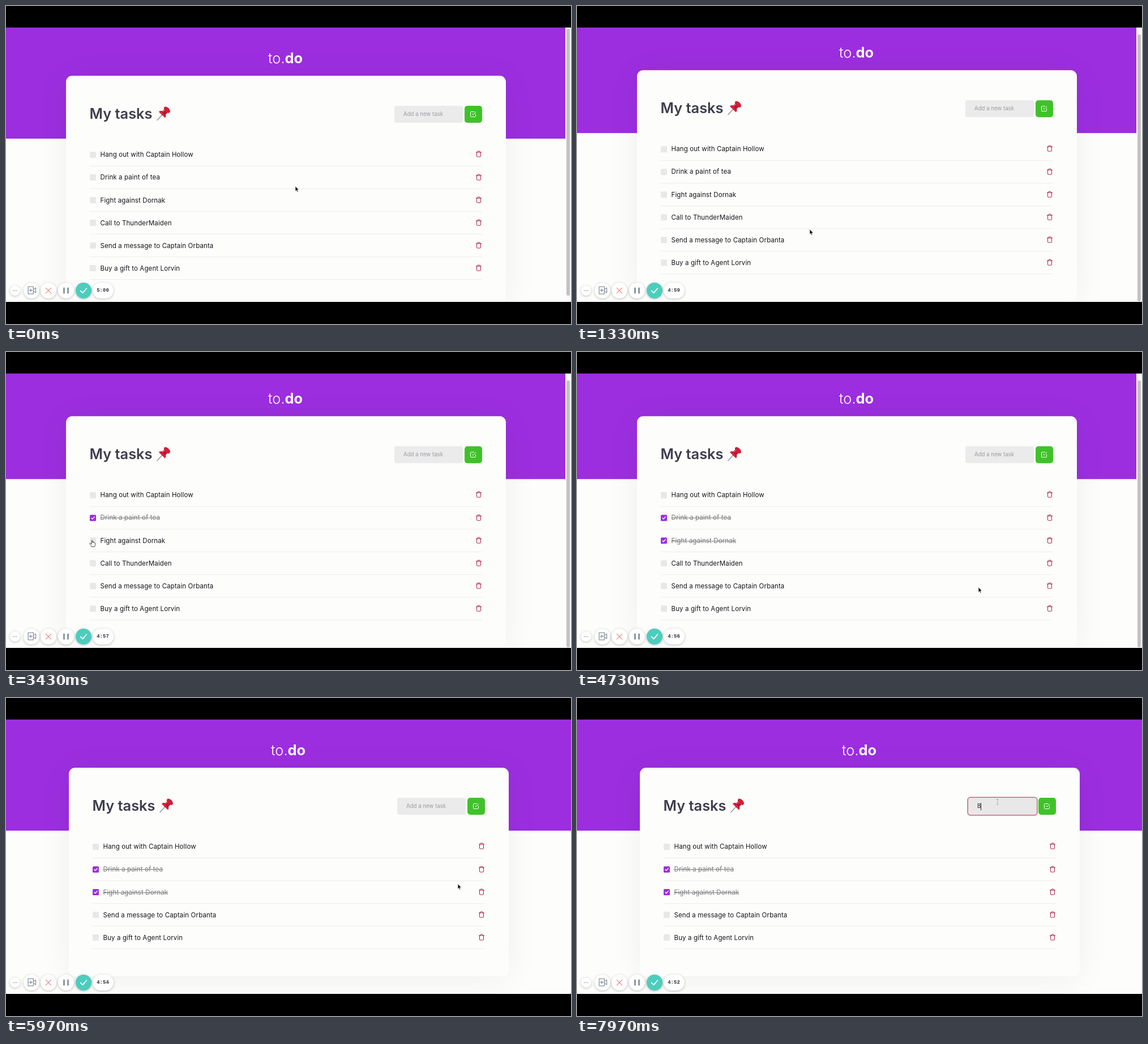
An HTML page for the animation above (8000 ms loop, 998 px wide and 561 px high).

```html
<!DOCTYPE html>
<html lang="en">
<head>
<meta charset="utf-8">
<title>Task list</title>
<style>
  html, body { margin: 0; width: 100%; height: 100%; overflow: hidden; background: #000; }
  #stage { position: relative; width: 998px; height: 561px; overflow: hidden; background: #000;
    font-family: Inter, "Open Sans", sans-serif; }
  #stage div, #stage svg { position: absolute; box-sizing: border-box; }
  svg { overflow: visible; fill: none; stroke-linecap: round; stroke-linejoin: round; }
  #view { left: 0; top: 37.5px; width: 998px; height: 484.5px; overflow: hidden; background: #fdfdfb; }
  #page { left: 0; top: 0; width: 988px; height: 494px; }
  #band { left: -10px; top: 0; width: 1020px; height: 196.5px; background: #9c2edf; }
  #brand { left: 463px; top: 38.5px; font-size: 25.4px; line-height: 31px; font-weight: 300; color: #fff; white-space: nowrap; }
  #brand b { font-weight: 700; }
  #card { left: 106px; top: 85.5px; width: 776.5px; border-radius: 11px; background: #fdfdfb; box-shadow: 0 4px 58px rgba(0,0,0,.06); }
  #head { left: 41.5px; top: 51px; font-size: 25.4px; line-height: 32px; font-weight: 620; color: #3d3d4d; white-space: nowrap; }
  #pin { left: 160px; top: 54px; }
  #field { left: 580px; top: 52.5px; width: 121px; height: 30.5px; border-radius: 4px; background: #ebebeb; }
  #field.on { background: #e8e8e8; box-shadow: 0 0 0 1.6px #d4607c; }
  #entry { left: 16px; top: 0; font-size: 9.65px; line-height: 30px; color: #9c9ca4; white-space: nowrap; }
  #entry.typed { color: #222; }
  #caret { top: 9px; width: 1px; height: 13px; background: #222; }
  #add { left: 704px; top: 52.5px; width: 30.5px; height: 30.5px; border-radius: 5px; background: #3fc229; }
  .row { left: 41.5px; width: 693px; height: 40.1px; border-bottom: 1px solid #ededf0; }
  .box { left: 0; top: 14px; width: 11px; height: 11px; border-radius: 1.5px; background: #e8e8e8; }
  .box svg { display: none; }
  .name { left: 19px; top: 9.5px; font-size: 11.5px; line-height: 20px; letter-spacing: .12px; color: #15151c; white-space: nowrap; }
  .done .box { background: #9c2edf; }
  .done .box svg { display: block; }
  .done .name { color: #77777f; text-decoration: line-through; }
  #track { right: 0; top: 0; width: 10.5px; height: 484.5px; background: #fafafa; }
  #thumb { left: 2.5px; width: 6px; height: 471px; border-radius: 3px; background: #c2c2c2; }
  .tool { background: #fff; border-radius: 15px; box-shadow: 0 1px 4px rgba(0,0,0,.25); }
  #clock { left: 152.5px; top: 487.5px; width: 37px; height: 28px; text-align: center; color: #333340;
    font: bold 9px/28px "Liberation Mono", "DejaVu Sans Mono", monospace; }
</style>
</head>
<body>
<div id="stage">
  <div id="view">
    <div id="page">
      <div id="band"></div>
      <div id="brand">to.<b>do</b></div>
      <div id="card">
        <div id="head">My tasks</div>
        <svg id="pin" width="25" height="26" viewBox="0 0 25 26">
          <path d="M1 24.5 10 14.5" stroke="#8d99a3" stroke-width="1.5"/>
          <path d="M4.5 10.2C3.6 8.6 6.2 7.4 10 8.4L14.6 4.4 20.3 10.2 16 14.4C17 18.2 15.6 20.6 14 19.6Z" fill="#c4132f"/>
          <path d="M5 9.7C9 10.5 13.5 15 14.6 19.4" stroke="#e5364c" stroke-width="1.4"/>
          <ellipse cx="18.4" cy="6.2" rx="6.8" ry="4" transform="rotate(45 18.4 6.2)" fill="#d01f39"/>
          <path d="M10.7 9.4 14.2 6.4" stroke="#ee6475" stroke-width="1.3"/>
        </svg>
        <div id="field"><div id="entry"></div><div id="caret"></div></div>
        <div id="add"></div>
      </div>
    </div>
    <div id="track"><div id="thumb"></div></div>
  </div>
  <div id="tools"></div>
  <svg id="cursor" width="1" height="1" style="left:0;top:0">
    <path data-kind="arrow" d="M0 0V9L2 7.2 3.5 10.3 5 9.6 3.6 6.6H6.4Z" fill="#111" stroke="#fff" stroke-width=".7"/>
    <path data-kind="hand" d="M-.9.8C-.9-.3.9-.3.9.8V4C2-.0 2.6 4 2.6 4.5 3.2 3.6 4 4 4.1 4.9 5 4.2 5.6 5 5.6 5.8V8.2C5.6 9.4 4.6 10 4.6 11.5H-1C-1.3 9.8-3.6 7.6-4.2 6.2-4.5 5.2-3.3 4.8-2.4 5.6L-.9 7Z" fill="#fff" stroke="#222" stroke-width=".8"/>
    <path data-kind="beam" d="M0-4V5M-1.4-4H1.4M-1.4 5H1.4" stroke="#777" stroke-width=".9" stroke-dasharray="1 2.4"/>
  </svg>
</div>
<script>
const LOOP = 8000;
const REMOVED = 5300, FOCUS = 7100, CARET_OFF = 7550, TYPED = 7850;
const $ = id => document.getElementById(id);

const icon = (x, y, size, color, width, body) =>
  `<svg style="left:${x}px;top:${y}px" width="${size}" height="${size}" viewBox="0 0 24 24"
    stroke="${color}" stroke-width="${width}">${body}</svg>`;

const TICK = '<path d="M5 12.5 10 17.5 19 7"/>';
const TRASH = '<path d="M3 6H21M19 6V20a2 2 0 0 1-2 2H7a2 2 0 0 1-2-2V6M8 6V4a2 2 0 0 1 2-2h4a2 2 0 0 1 2 2V6"/>';
const CHECK_SQUARE = '<path d="M9 11 12 14 22 4M21 12V19a2 2 0 0 1-2 2H5a2 2 0 0 1-2-2V5a2 2 0 0 1 2-2H16"/>';

$('add').innerHTML = icon(9.3, 9.3, 12, '#fff', 2, CHECK_SQUARE);

// text and the moment the task is ticked off
const tasks = [
  ['Hang out with Captain Hollow'],
  ['Drink a paint of tea', 2650],
  ['Fight against Dornak', 3720],
  ['Call to ThunderMaiden'],
  ['Send a message to Captain Orbanta'],
  ['Buy a gift to Agent Lorvin']
];
const GONE = 3;
const rows = tasks.map(([text]) => {
  const row = document.createElement('div');
  row.className = 'row';
  row.innerHTML = `<div class="box">${icon(1, 1, 9, '#fff', 3.6, TICK)}</div>` +
    `<div class="name">${text}</div>` + icon(681.5, 12.7, 12, '#b01c4a', 2, TRASH);
  $('card').append(row);
  return row;
});

const tool = (cx, r, color, art) =>
  `<div class="tool" style="left:${cx - r}px;top:${501.5 - r}px;width:${2 * r}px;height:${2 * r}px;background:${color}">${art}</div>`;
$('tools').innerHTML =
  tool(15.5, 9, '#fff', icon(5, 5, 8, '#666', 4, '<path d="M3 12h.1M12 12h.1M21 12h.1"/>')) +
  tool(45, 14, '#fff', icon(5.5, 5.5, 17, '#89939b', 1.8,
    '<path d="M3 3H16V21H3ZM16 10 22 6V18L16 14M9.5 8.5V15.5M6 12H13"/>')) +
  tool(75, 14, '#fff', icon(7, 7, 14, '#ef8580', 2.2, '<path d="M4 4 20 20M20 4 4 20"/>')) +
  tool(106, 14, '#fff', icon(7, 7, 14, '#8b959d', 5, '<path stroke-linecap="butt" d="M6 3V21M18 3V21"/>')) +
  tool(136.5, 14, '#4ccdbd', icon(5, 5, 18, '#fff', 2.4, TICK)) +
  '<div id="clock" class="tool"></div>';

// time, x, y, pointer shape from here on
const path = [
  [0, 511, 318, 'arrow'], [150, 511, 318, 'arrow'], [850, 411, 394, 'arrow'], [1450, 411, 394, 'arrow'],
  [2000, 183, 283, 'arrow'], [2250, 157, 292, 'hand'], [2400, 153, 292, 'hand'], [2950, 153, 292, 'hand'],
  [3300, 152, 332, 'hand'], [3900, 152, 332, 'hand'], [4020, 170, 336, 'arrow'], [4730, 709, 415, 'arrow'],
  [5080, 831, 374, 'hand'], [5450, 834, 371, 'hand'], [5600, 826, 360, 'arrow'], [5970, 798, 328, 'arrow'],
  [6250, 798, 328, 'arrow'], [6750, 748, 203, 'beam'], [7000, 743, 183, 'beam'], [LOOP, 743, 183, 'beam']
];
const shapes = [...document.querySelectorAll('[data-kind]')];
const ease = u => u * u * (3 - 2 * u);
const ramp = (t, from, to) => Math.min(1, Math.max(0, (t - from) / (to - from)));

function moveCursor(t) {
  const i = path.findIndex((p, n) => t < path[n + 1][0]);
  const [t0, x0, y0, kind] = path[i], [t1, x1, y1] = path[i + 1];
  const u = ease(ramp(t, t0, t1));
  $('cursor').style.transform = `translate(${x0 + (x1 - x0) * u}px,${y0 + (y1 - y0) * u}px)`;
  shapes.forEach(s => s.style.display = s.dataset.kind === kind ? '' : 'none');
}

function draw(t) {
  const short = t >= REMOVED;
  const scroll = short ? 0 : 9.8 * ease(ramp(t, 770, 1320));
  $('page').style.transform = `translate(${short ? 5 : 0}px,${-scroll}px)`;
  $('track').style.display = short ? 'none' : '';
  $('thumb').style.top = 2.5 + scroll * .97 + 'px';
  $('card').style.height = (short ? 368 : 408) + 'px';

  let slot = 0;
  rows.forEach((row, i) => {
    const hidden = short && i === GONE;
    row.style.display = hidden ? 'none' : '';
    row.style.top = 119.8 + 40.1 * slot + 'px';
    row.classList.toggle('done', t >= tasks[i][1]);
    if (!hidden) slot++;
  });

  const typed = t >= TYPED;
  $('field').className = t >= FOCUS ? 'on' : '';
  $('entry').className = typed ? 'typed' : '';
  $('entry').textContent = typed ? 'B' : 'Add a new task';
  $('caret').style.left = (typed ? 22.3 : 16) + 'px';
  $('caret').style.display = typed || (t >= FOCUS && t < CARET_OFF) ? '' : 'none';

  const left = 300 - Math.max(0, Math.floor((t - 980) / 997) + 1);
  $('clock').textContent = Math.floor(left / 60) + ':' + String(left % 60).padStart(2, '0');
  moveCursor(t);
}

function frame() {
  draw(performance.now() % LOOP);
  requestAnimationFrame(frame);
}
frame();
</script>
</body>
</html>
```
